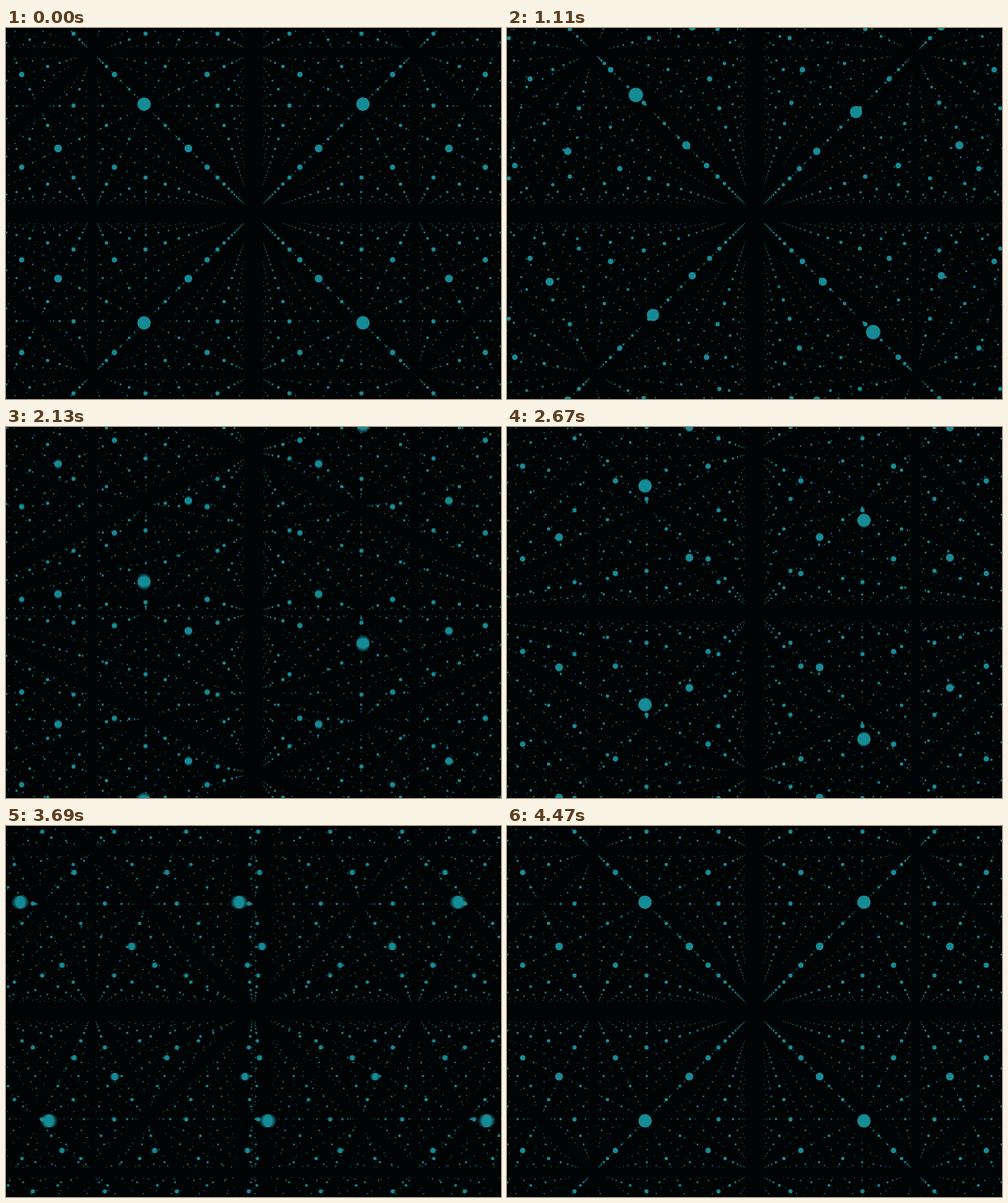
An HTML page with a canvas for the animation above (4.5 s loop, 800x600 px).

```html
<!DOCTYPE html>
<html lang="en">
<head>
<meta charset="utf-8">
<title>Sliding lattice</title>
<style>
  html, body { margin: 0; width: 100%; height: 100%; overflow: hidden; background: rgb(1, 4, 5); }
  canvas { display: block; }
</style>
</head>
<body>
<canvas id="stage" width="800" height="600"></canvas>
<script>
const W = 800, H = 600;
const STEP = 30, FRAMES = 150, PHASE = 50;
const CELL = 520, NEAR = 0.47, LAYERS = 18;
const SAMPLES = 5, SHUTTER = 0.55, MID = 0.42;

const ctx = document.getElementById('stage').getContext('2d');
const layer = document.createElement('canvas');
layer.width = W;
layer.height = H;
const dots = layer.getContext('2d');
dots.fillStyle = 'rgb(20, 135, 145)';

const clamp = v => Math.max(0, Math.min(1, v));
const isOdd = n => (n & 1) === 1;

function ease(p) {
  const g = 2.15;
  return p < 0.5 ? 0.5 * (2 * p) ** g : 1 - 0.5 * (2 - 2 * p) ** g;
}

function addDot(x, y, r) {
  if (x < -r || x > W + r || y < -r || y > H + r) return;
  if (r < 1.3) {
    const side = r * 1.77;
    dots.rect(x - side / 2, y - side / 2, side, side);
  } else {
    dots.moveTo(x + r, y);
    dots.arc(x, y, r, 0, Math.PI * 2);
  }
}

// Every other line of dots slides the opposite way along the active axis.
function drawLines(axis, k, odd, shift) {
  const d = k + NEAR + (axis === 'z' ? shift : 0);
  const alpha = clamp(1.22 - d * 0.045) * clamp(LAYERS - 0.53 - d);
  if (d < NEAR || alpha <= 0) return;

  const size = CELL / d, r = 16.1 / d - 0.2;
  const sx = axis === 'x' ? shift : 0, sy = axis === 'y' ? shift : 0;
  const nx = Math.ceil(W / 2 / size) + 1, ny = Math.ceil(H / 2 / size) + 1;

  dots.globalAlpha = alpha;
  dots.beginPath();
  for (let i = -nx; i < nx; i++) {
    for (let j = -ny; j < ny; j++) {
      const key = axis === 'z' ? i + j : axis === 'y' ? i + k : j + k;
      if (isOdd(key) !== odd) continue;
      addDot(W / 2 + (i + 0.5 + sx) * size, H / 2 + (j + 0.5 + sy) * size, r);
    }
  }
  dots.fill();
}

function drawLattice(time) {
  const axis = 'zyx'[Math.floor(time / PHASE) % 3];
  const s = ease((time % PHASE) / PHASE);
  dots.clearRect(0, 0, W, H);
  for (let k = LAYERS - 1; k >= 0; k--) {
    drawLines(axis, k, false, s);
    drawLines(axis, k, true, -s);
  }
}

// Motion blur: the average of several moments within the shutter.
function render(frame) {
  ctx.globalCompositeOperation = 'source-over';
  ctx.globalAlpha = 1;
  ctx.fillStyle = 'rgb(1, 4, 5)';
  ctx.fillRect(0, 0, W, H);
  ctx.globalCompositeOperation = 'lighter';
  ctx.globalAlpha = 1 / SAMPLES;
  for (let n = 0; n < SAMPLES; n++) {
    drawLattice(frame + MID + SHUTTER * ((n + 0.5) / SAMPLES - 0.5));
    ctx.drawImage(layer, 0, 0);
  }
}

const start = performance.now();
let shown = -1;

function tick() {
  const frame = Math.floor((performance.now() - start) / STEP) % FRAMES;
  if (frame !== shown) render(shown = frame);
  requestAnimationFrame(tick);
}
tick();
</script>
</body>
</html>
```
